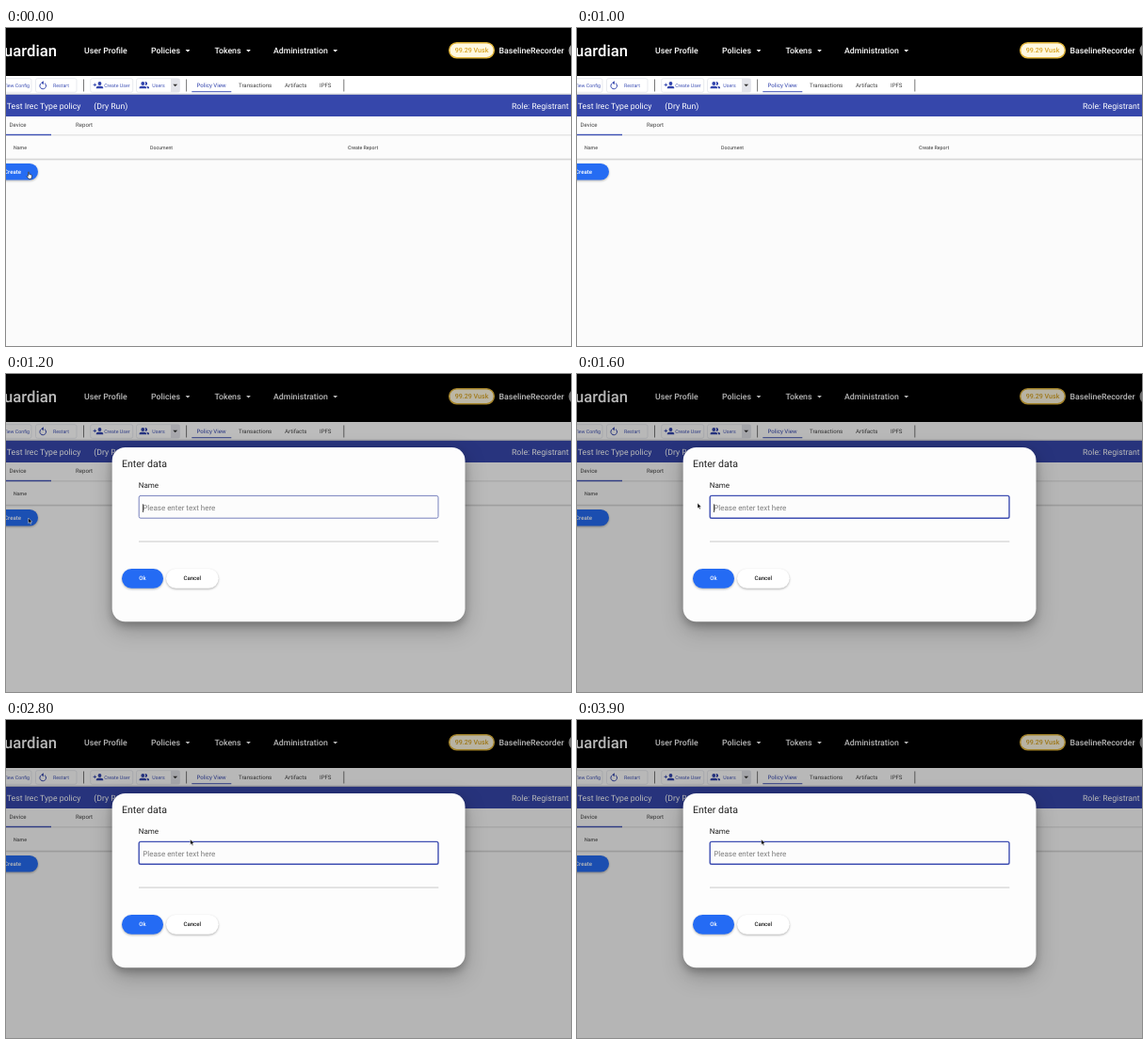
An HTML page for the animation above (4000 ms loop, 600 px wide and 338 px high).

```html
<!DOCTYPE html>
<html lang="en">
<head>
<meta charset="utf-8">
<title>Create device dialog</title>
<style>
  html, body { margin: 0; width: 100%; height: 100%; overflow: hidden; background: #fbfbfb; }
  svg { display: block; width: 600px; height: 338px; }
  text { font-family: Roboto, sans-serif; text-rendering: geometricPrecision; white-space: pre; }
  .nav { font-size: 8.75px; font-weight: 500; fill: #fff; }
  .bar { font-size: 8.7px; fill: #fff; }
  .tool { font-size: 5.25px; fill: #3f51b5; }
  .tab { font-size: 6.1px; fill: #444; }
  .col { font-size: 5.25px; fill: #333; }
  .btn { font-size: 6.1px; font-weight: 500; }
  .box { fill: #fff; stroke: #dfe1e8; stroke-width: .7; }
  .sep { stroke: #555; stroke-width: .8; }
  .icon { fill: #3244ad; }
  .end { text-anchor: end; }
  .mid { text-anchor: middle; }
  .raised { filter: drop-shadow(0 1px 1px rgba(0,0,0,.3)); }
  .sheet { filter: drop-shadow(0 4px 4px rgba(0,0,0,.24)) drop-shadow(0 8px 11px rgba(0,0,0,.24)); }
  #dialog { transform-origin: 300px 170.5px; }
</style>
</head>
<body>
<svg viewBox="0 0 600 338">
  <defs>
    <g id="person" class="icon">
      <circle cx="0" cy="-2" r="1.9"/>
      <path d="M-3.7 3.2V2.1C-3.7.2 3.7.2 3.7 2.1V3.2Z"/>
    </g>
    <path id="down" d="M-2.4 -1.2H2.4L0 1.3Z"/>
  </defs>

  <rect width="600" height="338" fill="#fbfbfb"/>

  <!-- header -->
  <rect width="600" height="51" fill="#000"/>
  <text class="end" x="54" y="29.5" font-size="16.7" font-weight="500" fill="#fff">uardian</text>
  <g class="nav">
    <text x="83" y="27">User Profile</text>
    <text x="154" y="27">Policies</text>
    <text x="221.5" y="27">Tokens</text>
    <text x="284" y="27">Administration</text>
    <text x="523.5" y="27">BaselineRecorder</text>
    <use href="#down" x="193" y="24.3"/>
    <use href="#down" x="257.5" y="24.3"/>
    <use href="#down" x="349.7" y="24.3"/>
  </g>
  <rect x="470.7" y="15.7" width="47.6" height="16" rx="8" fill="#fff8e0" stroke="#e2b53a" stroke-width="1.5"/>
  <text class="mid" x="494.5" y="26.3" font-size="7.1" font-weight="500" fill="#d9a421">99.29 Vusk</text>
  <circle cx="605.5" cy="24" r="8" fill="#9a9a9a"/>

  <!-- toolbar -->
  <rect y="51" width="600" height="20" fill="#fff"/>
  <rect class="box" x="-20" y="53.7" width="47" height="14.6" rx="2"/>
  <rect class="box" x="31.5" y="53.7" width="43.5" height="14.6" rx="2"/>
  <rect class="box" x="89.7" y="53.7" width="45" height="14.6" rx="2"/>
  <rect class="box" x="138.5" y="53.7" width="46" height="14.6" rx="2"/>
  <rect x="175" y="54" width="9.3" height="14" fill="#e3e4ea"/>
  <use href="#down" x="179.7" y="61" fill="#333"/>
  <path class="sep" d="M82.5 54.5V67.5M191.6 54.5V67.5M358.8 54.5V67.5"/>
  <path d="M37.3 58.8A3.3 3.3 0 1 0 41 58.7" fill="none" stroke="#3244ad"/>
  <path class="icon" d="M39.9 56.2V60.2L37.2 58.2Z"/>
  <use href="#person" x="99.5" y="61"/>
  <path d="M92.6 60.4H96M94.3 58.7V62.1" stroke="#3244ad" stroke-width=".9"/>
  <use href="#person" x="145.3" y="61"/>
  <path class="icon" d="M147.6 57.2A1.9 1.9 0 1 1 147.6 60.8Q148.6 59 147.6 57.2ZM149 61.7C151 61.9 152 62.5 152 63.3V64.2H149.8V63Q149.8 62.2 149 61.7Z"/>
  <g class="tool">
    <text class="end" x="25" y="63">View Config</text>
    <text x="50" y="63">Restart</text>
    <text x="104.2" y="63">Create User</text>
    <text x="155.3" y="63">Users</text>
  </g>
  <g class="tab">
    <text x="202.5" y="63" style="fill:#3244ad">Policy View</text>
    <text x="247" y="63">Transactions</text>
    <text x="296" y="63">Artifacts</text>
    <text x="333" y="63">IPFS</text>
  </g>
  <rect x="197.3" y="67.2" width="42" height="1" fill="#3f51b5"/>
  <rect y="69.7" width="600" height="1.3" fill="#bfc2cf"/>

  <!-- policy bar -->
  <rect y="71" width="600" height="23" fill="#3647ab"/>
  <g class="bar">
    <text x=".8" y="86">Test Irec Type policy</text>
    <text x="93.3" y="86">(Dry Run)</text>
    <text class="end" x="597.7" y="86">Role: Registrant</text>
  </g>

  <!-- tabs and table head -->
  <rect y="94" width="600" height="45" fill="#fcfcfc"/>
  <text class="tab" x="3.5" y="105.3">Device</text>
  <text class="tab" x="74" y="105.3">Report</text>
  <rect y="113.5" width="600" height=".8" fill="#d3d3d3"/>
  <rect y="112.8" width="48" height="1.4" fill="#3f51b5"/>
  <text class="col" x="8" y="129">Name</text>
  <text class="col" x="153" y="129">Document</text>
  <text class="col" x="363" y="129">Create Report</text>
  <rect y="138.8" width="600" height="1" fill="#c9c9c9"/>
  <rect y="139.8" width="600" height="1.2" fill="#ececec"/>
  <rect class="raised" x="-24" y="144" width="58" height="17.5" rx="8.75" fill="#256cf3"/>
  <text class="btn end" x="16" y="155" fill="#fff">Create</text>

  <rect id="shade" width="600" height="338" fill="#000" opacity="0"/>

  <g id="dialog" opacity="0">
    <rect class="sheet" x="112.7" y="78" width="374.8" height="185.3" rx="14" fill="#fdfdfd"/>
    <text x="123" y="99.3" font-size="10.55" fill="#222">Enter data</text>
    <text x="140.8" y="121.3" font-size="8" fill="#222">Name</text>
    <rect id="field" x="141.2" y="129.4" width="317.8" height="23.8" rx="1.8" fill="#fcfcfc"/>
    <text x="145.2" y="145.3" font-size="8" fill="#7d7d7d">Please enter text here</text>
    <rect id="caret" x="145.2" y="138.3" width=".8" height="8.7" fill="#222"/>
    <rect x="141" y="177.6" width="318.3" height=".9" fill="#c4c4c4"/>
    <rect class="raised" x="123" y="207" width="44" height="20.7" rx="10.35" fill="#246bf4"/>
    <text class="btn mid" x="145" y="219.3" fill="#fff">Ok</text>
    <rect class="raised" x="170" y="207" width="55.7" height="20.7" rx="10.35" fill="#fff"/>
    <text class="btn mid" x="197.8" y="219.3" fill="#222">Cancel</text>
  </g>

  <path id="hand" transform="translate(25 156.5)" fill="#fff" stroke="#111" stroke-width=".6" stroke-linejoin="round"
    d="M-1.5 -3.3Q-.9 -4 -.4 -3.3V-.9L1.8 -.5Q2.6 -.2 2.5 .7L2 3.8H-1L-2.9 1.1Q-2.7 .2 -1.5 .9Z"/>
  <path id="arrow" fill="#000" stroke="#fff" stroke-width=".45" stroke-linejoin="round"
    d="M0 0V5.6L1.3 4.4L2.2 6.5L3.2 6.1L2.3 4.1H4Z"/>
</svg>
<script>
  const LOOP = 4000, TICK = 100, OPEN = 1100;
  const SHADE = 0.28;
  const el = id => document.getElementById(id);
  const [shade, dialog, field, caret, hand, arrow] =
    ['shade', 'dialog', 'field', 'caret', 'hand', 'arrow'].map(el);

  const set = (node, attrs) => {
    for (const key in attrs) node.setAttribute(key, attrs[key]);
  };
  const within = (t, spans) => spans.some(([from, to]) => t >= from && t < to);
  const smooth = p => p * p * (3 - 2 * p);
  const clamp = p => Math.min(1, Math.max(0, p));

  // [start, backdrop, dialog opacity, scale, border colour, border width]
  const steps = [
    [0, 0, 0, 0.7, '#d0d0d0', 0.8],
    [OPEN, 0.78, 0.94, 0.963, '#c9c9c9', 0.8],
    [1200, 0.94, 1, 1, '#7781bd', 1],
    [1300, 1, 1, 1, '#3f4fb2', 1.4]
  ];
  const caretOn = [[1200, 1700], [2200, 2800], [3300, 3800]];

  function draw(t) {
    const [, dim, alpha, scale, stroke, width] = steps.filter(s => s[0] <= t).pop();
    set(shade, { opacity: dim * SHADE });
    set(dialog, { opacity: alpha });
    dialog.style.transform = `scale(${scale})`;
    set(field, { stroke, 'stroke-width': width });
    set(caret, { opacity: +within(t, caretOn) });

    const p = smooth(clamp((t - 1200) / 700));
    set(hand, { opacity: +(t < 1000) });
    set(arrow, {
      opacity: +(t >= OPEN),
      transform: `translate(${23.7 + 172 * p} ${153 - 26 * p})`
    });
  }

  function frame() {
    const t = performance.now() % LOOP;
    draw(Math.floor(t / TICK) * TICK);
    requestAnimationFrame(frame);
  }
  frame();
</script>
</body>
</html>
```
